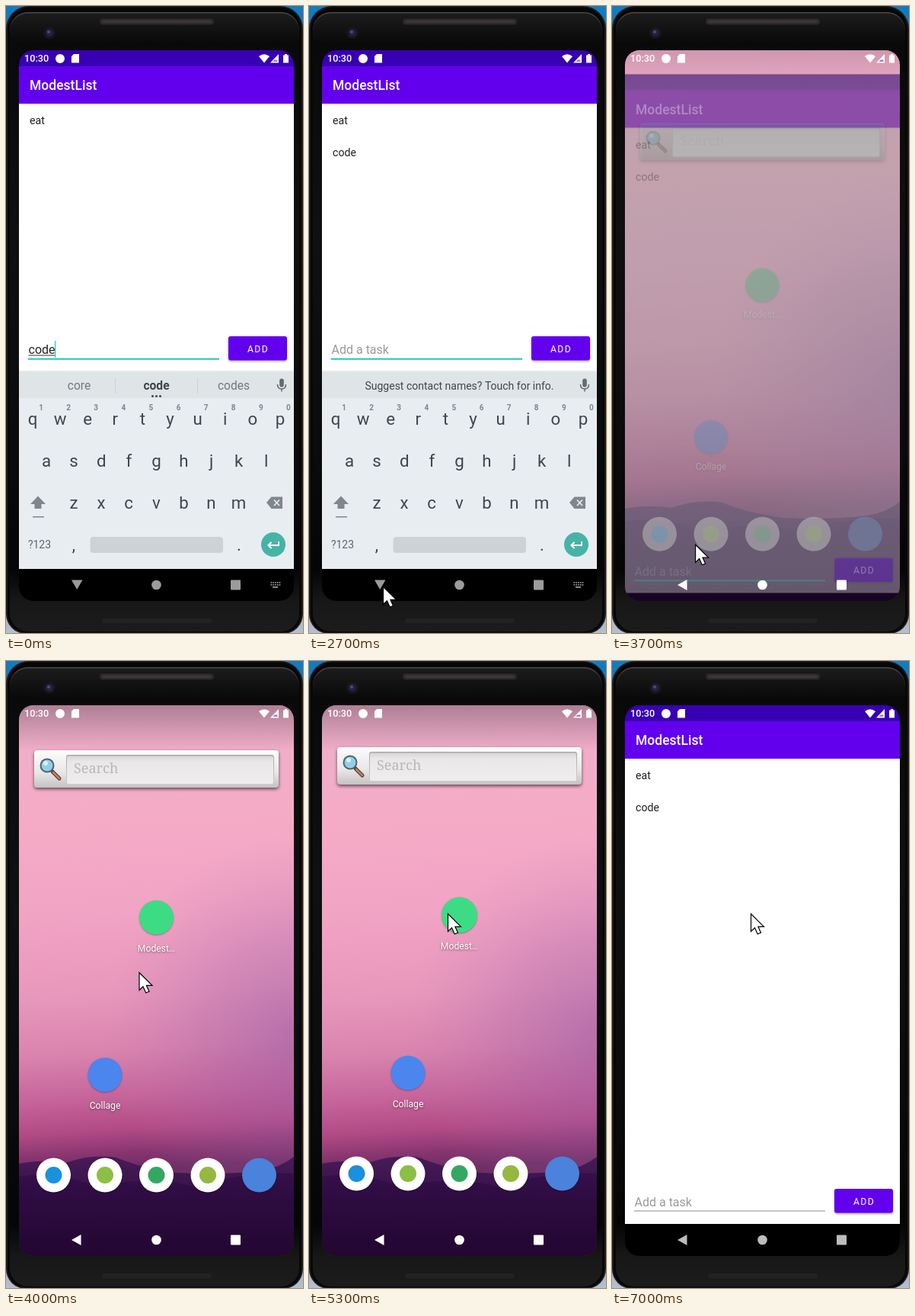
Animation, 390 px wide and 822 px high, one loop 7100 ms. Source, as an HTML page with a canvas:

```html
<!DOCTYPE html>
<html lang="en">
<head>
<meta charset="utf-8">
<title>To-do app demo</title>
<style>
html, body { margin: 0; width: 100%; height: 100%; overflow: hidden; background: #000; }
canvas { display: block; width: 390px; height: 822px; }
</style>
</head>
<body>
<canvas id="stage"></canvas>
<script>
const LOOP = 7100, STEP = 100;
const ADD_AT = 1200, HIDE_KEYS = 2800, EXIT = 3400, HOME = 3600, LAUNCH = 5350, LAUNCH_END = 6100;
const PURPLE = '#6200ee', TEAL = '#15cdba', INK = '#3c474d', KEY_GREY = '#7d878d';
const canvas = document.getElementById('stage');
const c = canvas.getContext('2d');
const ratio = window.devicePixelRatio || 1;
canvas.width = 390 * ratio;
canvas.height = 822 * ratio;

const clamp = v => Math.max(0, Math.min(1, v));
const lerp = (a, b, p) => a + (b - a) * p;
const span = (t, a, b) => clamp((t - a) / (b - a));
const smooth = p => p * p * (3 - 2 * p);

function box(x, y, w, h, fill, r = 0) {
  c.fillStyle = fill;
  c.beginPath();
  c.roundRect(x, y, w, h, r);
  c.fill();
}
function disc(x, y, r, fill) {
  c.fillStyle = fill;
  c.beginPath();
  c.arc(x, y, r, 0, 7);
  c.fill();
}
function path(d, fill, stroke, width = 1) {
  const p = new Path2D(d);
  if (fill) { c.fillStyle = fill; c.fill(p); }
  if (stroke) { c.strokeStyle = stroke; c.lineWidth = width; c.stroke(p); }
}
function text(s, x, y, size, fill, align = 'left', weight = 400, family = 'Roboto, sans-serif') {
  c.font = `${weight} ${size}px ${family}`;
  c.textAlign = align;
  c.fillStyle = fill;
  c.fillText(s, x, y);
}
function addStops(g, stops) {
  stops.forEach(([at, color]) => g.addColorStop(at, color));
  return g;
}
const gradient = (x0, y0, x1, y1, stops) => addStops(c.createLinearGradient(x0, y0, x1, y1), stops);
const glow = (x, y, r, stops) => addStops(c.createRadialGradient(x, y, 0, x, y, r), stops);
function shadow(color, blur, y) {
  c.shadowColor = color;
  c.shadowBlur = blur * ratio;
  c.shadowOffsetY = y * ratio;
}
function layer(draw, alpha = 1) {
  if (alpha <= 0) return;
  c.save();
  c.globalAlpha *= alpha;
  draw();
  c.restore();
}

function phone() {
  box(0, 0, 390, 822, gradient(0, 0, 0, 822, [[0, '#147cc0'], [.3, '#164a78'], [.7, '#2a3948'], [1, '#b4c0d2']]));
  box(0, 0, 390, 823, '#1d1d1e', [30, 30, 26, 26]);
  box(2, 1.5, 386, 820, '#070707', [28, 28, 24, 24]);
  box(5, 8, 380, 812, gradient(0, 8, 0, 60, [[0, '#4a4a4a'], [1, '#0b0b0b']]), 24);
  box(5, 9.5, 380, 810.5, gradient(0, 8, 0, 820, [[0, '#1d1d1d'], [.05, '#090909'], [.35, '#101010'], [.7, '#0b0b0b'], [.9, '#050505'], [.95, '#171717'], [1, '#1c1c1c']]), 24);
  box(123, 16.5, 150, 8, '#2c2829', 4);
  box(126, 18.5, 144, 4, '#3b3536', 2);
  box(126, 803, 144, 6, '#232222', 3);
  disc(57, 35, 8, '#17161d');
  disc(57, 35, 5, '#25213b');
  disc(56, 34, 2, '#50487c');
}

function wallpaper() {
  box(17, 58, 361, 722, gradient(178, 58, 215, 665, [
    [0, '#efb0ca'], [.25, '#f5abc6'], [.45, '#f1a3c4'], [.62, '#e797bb'], [.74, '#d984ae'],
    [.84, '#c5649a'], [.91, '#b24a85'], [.96, '#87356f'], [1, '#6a2b62']]));
  box(17, 58, 361, 722, glow(390, 490, 260, [[0, 'rgba(150,90,165,.55)'], [.5, 'rgba(165,100,170,.3)'], [1, 'rgba(190,120,180,0)']]));
  path('M17 659Q50 653 78 658Q112 646 145 651Q175 664 225 671Q290 674 335 668Q360 664 378 650V780H17Z',
    gradient(0, 648, 0, 780, [[0, '#491c57'], [.4, '#35104a'], [1, '#240732']]));
  path('M17 676Q70 668 120 690Q190 672 250 690Q310 668 378 672V780H17Z',
    gradient(0, 668, 0, 780, [[0, 'rgba(48,12,70,.65)'], [1, 'rgba(34,6,48,.8)']]));
}

function homeScreen(t) {
  const lag = t < 5000 ? Math.exp(-(t - 4000) / 130) : 0;
  const at = y => y + (4.5 - .0037 * y) * lag;
  box(17, 58, 361, 60, gradient(0, 58, 0, 118, [[0, 'rgba(60,40,55,.36)'], [1, 'rgba(60,40,55,0)']]));

  layer(() => {
    c.translate(0, at(137) - 137);
    shadow('rgba(0,0,0,.6)', 4, 2);
    box(37, 113, 321, 49, gradient(0, 113, 0, 162, [[0, '#fdfdfd'], [.6, '#e8e6e7'], [1, '#c4c2c3']]), 4);
    shadow('transparent', 0, 0);
    box(79, 119, 273, 39, gradient(0, 119, 0, 158, [[0, '#a9a7a8'], [1, '#cfcdce']]), 3);
    box(80, 120.5, 271, 36.5, gradient(0, 121, 0, 157, [[0, '#d9d7d8'], [.2, '#e9e7e8'], [1, '#efedee']]), 2);
    text('Search', 89, 143, 18, '#b9b7b8', 'left', 400, '"Noto Serif", serif');
    c.lineCap = 'round';
    path('M61 141L70 150', null, '#5f3d31', 5);
    path('M62 142L70 150', null, '#b78361', 2.5);
    disc(54, 133, 9.5, '#53636d');
    disc(54, 133, 7.5, '#8fd0e8');
    disc(52, 130, 3, '#d4f0fa');
  });

  const pressed = t >= 5200 ? 1 : 0;
  const icon = (x, y, fill, mark, r = 22.5) => {
    shadow('rgba(0,0,0,.3)', 2, 1);
    disc(x, at(y), r, fill);
    shadow('transparent', 0, 0);
    if (mark) disc(x, at(y), 11, mark);
  };
  const label = (s, x, y) => {
    shadow('rgba(0,0,0,.5)', 3, 1);
    text(s, x, at(y), 12.2, '#fff', 'center');
    shadow('transparent', 0, 0);
  };
  icon(197.5, 333, '#3ddc84', null, 22.5 + pressed);
  label('Modest…', 197.5, 378);
  icon(130, 540, '#4a86ee');
  label('Collage', 130, 585);
  ['#1a91dc', '#8bbf45', '#34a862', '#94b840'].forEach((mark, i) => icon(62.5 + 67.5 * i, 672, '#fff', mark));
  icon(332.5, 672, '#4a82dc');
}

function statusIcons() {
  text('10:30', 24, 73.3, 12.7, '#fff', 'left', 500);
  disc(71, 69, 6, '#fff');
  path('M89 63H96V74.500H86V66Z', '#fff');
  path('M332 66Q339 60.500 346 66L339 74.500Z', '#fff');
  path('M358 63V74.500H347Z', '#fff');
  path('M352.500 70.500H356.500V73H350.500Z', '#9a80d0');
  path('M364 64.500H366V63H369V64.500H371V74.500H364Z', '#fff');
}

function navIcons(color, keysOpen) {
  path(keysOpen ? 'M86 752.500H100.500L93.200 765Z' : 'M98.500 752V766L86 759Z', color);
  disc(197.5, 759, 6.3, color);
  box(295, 752.5, 13, 13, color, 1);
  if (!keysOpen) return;
  for (let row = 0; row < 2; row++)
    for (let i = 0; i < 5; i++) box(347.5 + i * 2.8, 755 + row * 3, 1.6, 1.8, color);
  box(350, 761, 7, 1.7, color);
}

function inputRow(t, y) {
  const typed = t < ADD_AT, focused = t < 5000;
  const blink = typed ? t % 1000 < 500 : (t - ADD_AT) % 1000 < 500;
  text(typed ? 'code' : 'Add a task', 29.5, y + 5.5, 16, typed ? '#222' : '#9b9b9b');
  if (typed) box(29.5, y + 7, 34.5, 1, '#333');
  if (focused) box(29, y + 11.3, 251, 2, TEAL);
  else box(29, y + 11, 251, 1, '#8c8c8c');
  if (focused && blink) box(typed ? 64 : 29, y - 11.5, typed ? 1.2 : 2, 22, TEAL);
  shadow('rgba(0,0,0,.35)', 3, 1.5);
  box(292, y - 17.5, 77, 31.5, PURPLE, 3);
  shadow('transparent', 0, 0);
  c.letterSpacing = '1.3px';
  text('ADD', 331, y + 3, 12.2, '#fff', 'center');
  c.letterSpacing = '0px';
}

function keyboard(t) {
  box(17, 477, 361, 3, gradient(0, 477, 0, 480, [[0, 'rgba(0,0,0,0)'], [1, 'rgba(0,0,0,.12)']]));
  box(17, 480, 361, 258, '#e8edf1');
  box(17, 480, 361, 34, '#dfe4e7');
  if (t < ADD_AT) {
    text('core', 96, 503, 15.6, '#70797e', 'center');
    text('code', 197.5, 503, 15.6, INK, 'center', 700);
    text('codes', 299, 503, 15.6, '#70797e', 'center');
    box(143, 488, 1, 20, '#cbd1d4');
    box(251, 488, 1, 20, '#cbd1d4');
    for (let i = -1; i < 2; i++) disc(197.5 + i * 5, 511.5, 1.5, INK);
  } else {
    text('Suggest contact names? Touch for info.', 197.5, 503, 14, INK, 'center');
  }
  box(359.2, 488.5, 5.6, 11, '#626c72', 3);
  path('M356.500 496Q356.500 502 362 502Q367.500 502 367.500 496M362 502V505.500', null, '#626c72', 1.5);

  const row = (letters, x, y) => [...letters].forEach((s, i) => text(s, x + 36.1 * i, y, 22.3, INK, 'center'));
  row('qwertyuiop', 35, 549);
  row('asdfghjkl', 53, 604);
  row('zxcvbnm', 89, 659);
  [...'1234567890'].forEach((s, i) => text(s, 46 + 36.1 * i, 530, 10, KEY_GREY, 'center', 700));
  path('M42 642.500L52 653H46.500V659H37.500V653H32Z', KEY_GREY);
  box(35, 669, 15, 1.6, KEY_GREY);
  path('M342 651L348.500 643.500H363V659H348.500Z', KEY_GREY);
  path('M352 647.500L359 655M359 647.500L352 655', null, '#e8edf1', 1.7);
  text('?123', 44, 711, 14, '#5b666c', 'center');
  text(',', 89, 714, 22, INK, 'center');
  text('.', 306, 714, 22, INK, 'center');
  box(110.5, 696, 174.5, 21, '#ced2d6', 4);
  disc(351, 706, 16, '#47b3a7');
  path('M358 702V707H345M348.500 703L344.500 707L348.500 711', null, '#fff', 2);
}

function app(t) {
  box(17, 58, 361, 722, '#000');
  box(17, 128, 361, 610, '#fff');
  box(17, 58, 361, 21, '#3700b3');
  box(17, 79, 361, 49, PURPLE);
  box(17, 128, 361, 3, gradient(0, 128, 0, 131, [[0, 'rgba(0,0,0,.16)'], [1, 'rgba(0,0,0,0)']]));
  text('ModestList', 31, 110.3, 17.5, '#fff', 'left', 500);
  text('eat', 31, 155, 14.2, '#222');
  if (t >= ADD_AT) text('code', 31, 197, 14.2, '#222');
  inputRow(t, t < HIDE_KEYS + 100 ? 450.5 : 709.5);
  if (t < HIDE_KEYS + 300) layer(() => {
    c.beginPath();
    c.rect(17, 470, 361, 268);
    c.clip();
    c.translate(0, 262 * span(t, HIDE_KEYS - 50, HIDE_KEYS + 250) ** 1.5);
    keyboard(t);
  });
}

function launchingApp(t) {
  const p = 1 - (1 - span(t, LAUNCH, LAUNCH_END)) ** 4.34;
  const left = lerp(174, 17, p), right = lerp(220, 378, p);
  const top = lerp(310, 58, p ** 1.7), bottom = lerp(356, 780, p);
  const scale = (right - left) / 361;
  layer(() => {
    c.beginPath();
    c.roundRect(left, top, right - left, bottom - top, lerp(23, 4, p));
    c.clip();
    c.translate(left, top);
    c.scale(scale, scale);
    c.translate(-17, -58);
    app(t);
  }, span(t, LAUNCH - 50, LAUNCH + 150));
}

// Pointer stops: time, x, y
const stops = [
  [400, 392, 600], [900, 338, 447], [1900, 338, 447], [2600, 97, 761],
  [3600, 97, 761], [4000, 174.5, 408], [4400, 182, 331], [LOOP, 182, 331]
];
function pointer(t) {
  if (t < stops[0][0]) return;
  const i = stops.findIndex(s => s[0] > t);
  const [t0, x0, y0] = stops[i - 1], [t1, x1, y1] = stops[i];
  const p = smooth(span(t, t0, t1));
  layer(() => {
    c.translate(lerp(x0, x1, p), lerp(y0, y1, p));
    path('M.5 .5V23.500L5.500 18.700L9.200 27L13.500 25.200L9.900 17.300H17.500Z', '#fff', '#000', 1.2);
  });
}

function screen(t) {
  c.beginPath();
  c.roundRect(17, 58, 361, 722, 19);
  c.clip();
  const launching = t > LAUNCH && t < 5900;

  if (t > EXIT && t < LAUNCH_END) wallpaper();
  if (t >= HOME && t < 5600)
    layer(() => homeScreen(t), span(t, HOME, HOME + 200) * (1 - span(t, LAUNCH, LAUNCH + 200)));

  if (t < HOME + 200) {
    layer(() => {
      c.translate(0, 3.5 * (Math.max(0, t - EXIT) / 100) ** 2);
      app(t);
    }, 1 - span(t, EXIT + 100, HOME + 200));
  } else if (t > LAUNCH) {
    launchingApp(t);
  }

  if (launching) return;
  if (t >= 3300 && t < 3700) box(48, 740, 92, 39, 'rgba(255,255,255,.05)', 19);
  statusIcons();
  const grey = Math.round(t < HOME ? 155 : lerp(255, 188, span(t, 6500, 7000)));
  navIcons(`rgb(${grey},${grey},${grey})`, t < HIDE_KEYS);
}

function frame(now) {
  const t = Math.floor((now % LOOP) / STEP) * STEP;
  c.setTransform(ratio, 0, 0, ratio, 0, 0);
  phone();
  layer(() => screen(t));
  pointer(t);
  requestAnimationFrame(() => frame(performance.now() - start));
}
const start = performance.now();
frame(0);
</script>
</body>
</html>
```
